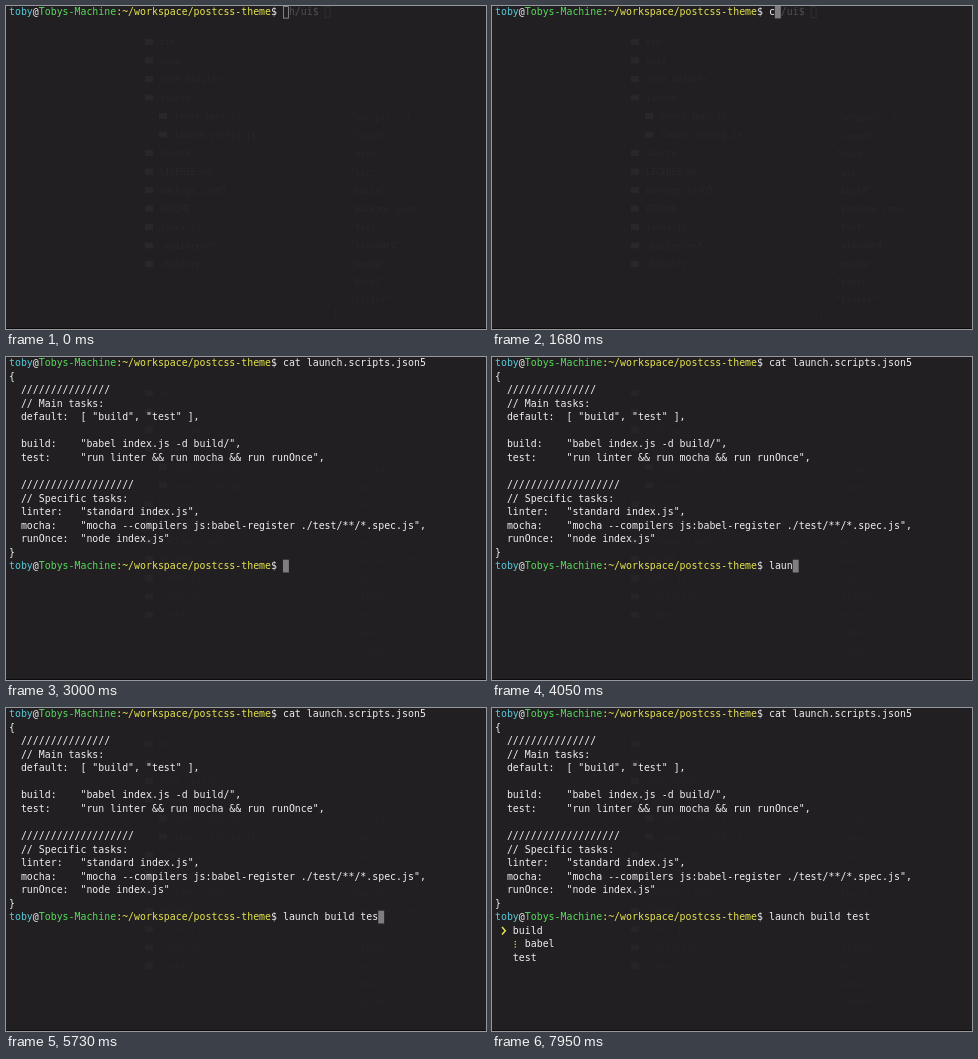
Animation, 480 px wide and 323 px high, one loop 8000 ms. Source, as an HTML page with a canvas:

```html
<!DOCTYPE html>
<html lang="en">
<head>
<meta charset="utf-8">
<title>Terminal</title>
<style>
  html, body { margin: 0; width: 100%; height: 100%; overflow: hidden; background: #211f21; }
  canvas { display: block; width: 480px; height: 323px; }
</style>
</head>
<body>
<canvas id="stage" width="480" height="323"></canvas>
<script>
const ctx = document.getElementById('stage').getContext('2d');
const LOOP = 8000;
const X0 = 3, CELL = 5.955, ROW = 13.54, BASE = 9.2;
const FONT = '9.9px "DejaVu Sans Mono", monospace';
const WHITE = '#f0eff0', CYAN = '#58c9d9', GREEN = '#58d95c', YELLOW = '#e5e44e';

const PROMPT = [
  ['toby', CYAN], ['@', WHITE], ['Tobys-Machine', GREEN],
  [':~/workspace/postcss-theme', YELLOW], ['$', WHITE]
];
const INPUT_COL = 46;

const LISTING = [
  '{',
  '  ///////////////',
  '  // Main tasks:',
  '  default:  [ "build", "test" ],',
  '',
  '  build:    "babel index.js -d build/",',
  '  test:     "run linter && run mocha && run runOnce",',
  '',
  '  ///////////////////',
  '  // Specific tasks:',
  '  linter:   "standard index.js",',
  '  mocha:    "mocha --compilers js:babel-register ./test/**/*.spec.js",',
  '  runOnce:  "node index.js"',
  '}'
];

// Key times in ms; tab completion fills the rest of the first command.
const CAT = 'cat launch.scripts.json5';
const CAT_KEYS = [1680, 1800, 1910, 2050, 2350, 2520];
const RUN = 'launch build test';
const RUN_KEYS = [3520, 3680, 3840, 4000, 4150, 4250, 4400, 4560, 4660, 4770, 4880,
                  5010, 5150, 5300, 5430, 5560, 5800];
const FOCUS = 400, COMPLETE = 2640, CAT_ENTER = 2850, RUN_ENTER = 6420, TASKS = 7100;

// Braille dots of the spinner as bit masks, left column 1-2-4, right column 8-16-32.
const SPINNER = [0x0b, 0x19, 0x39, 0x38, 0x3c, 0x34, 0x26, 0x27, 0x07, 0x0f];

// Windows dimly visible through the terminal: [x, y, text].
const TREE = ['bin', 'docs', 'node_modules', 'launch', '  index.spec.js', '  launch.config.js',
              'source', 'LICENSE.md', 'package.json5', 'README', 'index.js', '.editorconf', '.babelrc'];
const KEYS = ['"scripts": {', '"launch",', '"main",', '"src"', '"build"', '"package.json"',
              '"test"', '"standard"', '"mocha"', '"babel"', '"linter"'];

const xOf = col => X0 + col * CELL;
const typed = (keys, t) => keys.filter(k => k <= t).length;

function write(text, col, row, color) {
  ctx.fillStyle = color;
  [...text].forEach((ch, i) => {
    if (ch !== ' ') ctx.fillText(ch, xOf(col + i), BASE + row * ROW);
  });
}

function prompt(row) {
  let col = 0;
  for (const [text, color] of PROMPT) {
    write(text, col, row, color);
    col += text.length;
  }
}

function cursor(col, row, hollow) {
  const x = xOf(col), y = row * ROW - 0.4;
  if (hollow) {
    ctx.strokeStyle = '#9a989a';
    ctx.lineWidth = 0.8;
    ctx.strokeRect(x + 0.5, y + 1, CELL - 1, 11.5);
  } else {
    ctx.fillStyle = '#7f7d7f';
    ctx.fillRect(x, y, CELL, 12.8);
  }
}

function backdrop(t) {
  ctx.fillStyle = '#211f21';
  ctx.fillRect(0, 0, 480, 323);
  ctx.fillStyle = t < CAT_ENTER ? '#292729' : '#262426';
  ctx.font = '8.5px "DejaVu Sans Mono", monospace';
  TREE.forEach((name, i) => {
    const y = 39 + i * 18.5;
    const indent = name.startsWith(' ') ? 14 : 0;
    ctx.fillRect(139 + indent, y - 6, 8, 6);
    ctx.fillText(name.trim(), 154 + indent, y);
  });
  KEYS.forEach((key, i) => ctx.fillText(key, 344, 115 + i * 18.2));
  ctx.fillText('}', 327, 310);
  ctx.font = FONT;
}

// Remains of an earlier, longer prompt to the right of the cursor.
function remains(t, cursorCol) {
  if (t >= COMPLETE) return;
  [...'h/ui$'].forEach((ch, i) => {
    const col = INPUT_COL + 1 + i;
    if (col > cursorCol) write(ch, col, 0, '#514f51');
  });
  ctx.strokeStyle = '#343234';
  ctx.lineWidth = 0.8;
  ctx.strokeRect(xOf(53) + 0.5, 0.8, CELL - 1, 11);
}

function spinner(t) {
  const mask = SPINNER[Math.floor((t - TASKS) / 100) % SPINNER.length];
  ctx.fillStyle = YELLOW;
  for (let i = 0; i < 6; i++) {
    if (mask >> i & 1) ctx.fillRect(22.7 + (i > 2 ? 2.6 : 0), 233 + (i % 3) * 2.7, 1.2, 1.2);
  }
}

function tasks(t) {
  ctx.strokeStyle = YELLOW;
  ctx.lineWidth = 1.5;
  ctx.beginPath();
  ctx.moveTo(10, 219);
  ctx.lineTo(13.3, 222.7);
  ctx.lineTo(10, 226.4);
  ctx.stroke();
  write('build', 3, 16, WHITE);
  spinner(t);
  write('babel', 5, 17, WHITE);
  write('test', 3, 18, WHITE);
}

function draw(t) {
  backdrop(t);
  prompt(0);

  const catCount = t >= COMPLETE ? CAT.length : typed(CAT_KEYS, t);
  write(CAT.slice(0, catCount), INPUT_COL, 0, WHITE);

  if (t < CAT_ENTER) {
    const col = INPUT_COL + catCount;
    remains(t, col);
    cursor(col, 0, t < FOCUS);
  } else {
    LISTING.forEach((line, i) => write(line, 0, i + 1, WHITE));
    prompt(15);
    const runCount = typed(RUN_KEYS, t);
    write(RUN.slice(0, runCount), INPUT_COL, 15, WHITE);
    if (t < RUN_ENTER) cursor(INPUT_COL + runCount, 15);
    else if (t < TASKS) cursor(0, 16);
    else tasks(t);
  }

  ctx.fillStyle = '#0c0b0c';
  ctx.fillRect(0, 322, 480, 1);
}

const start = performance.now();
function tick() {
  draw((performance.now() - start) % LOOP);
  requestAnimationFrame(tick);
}
tick();
</script>
</body>
</html>
```
